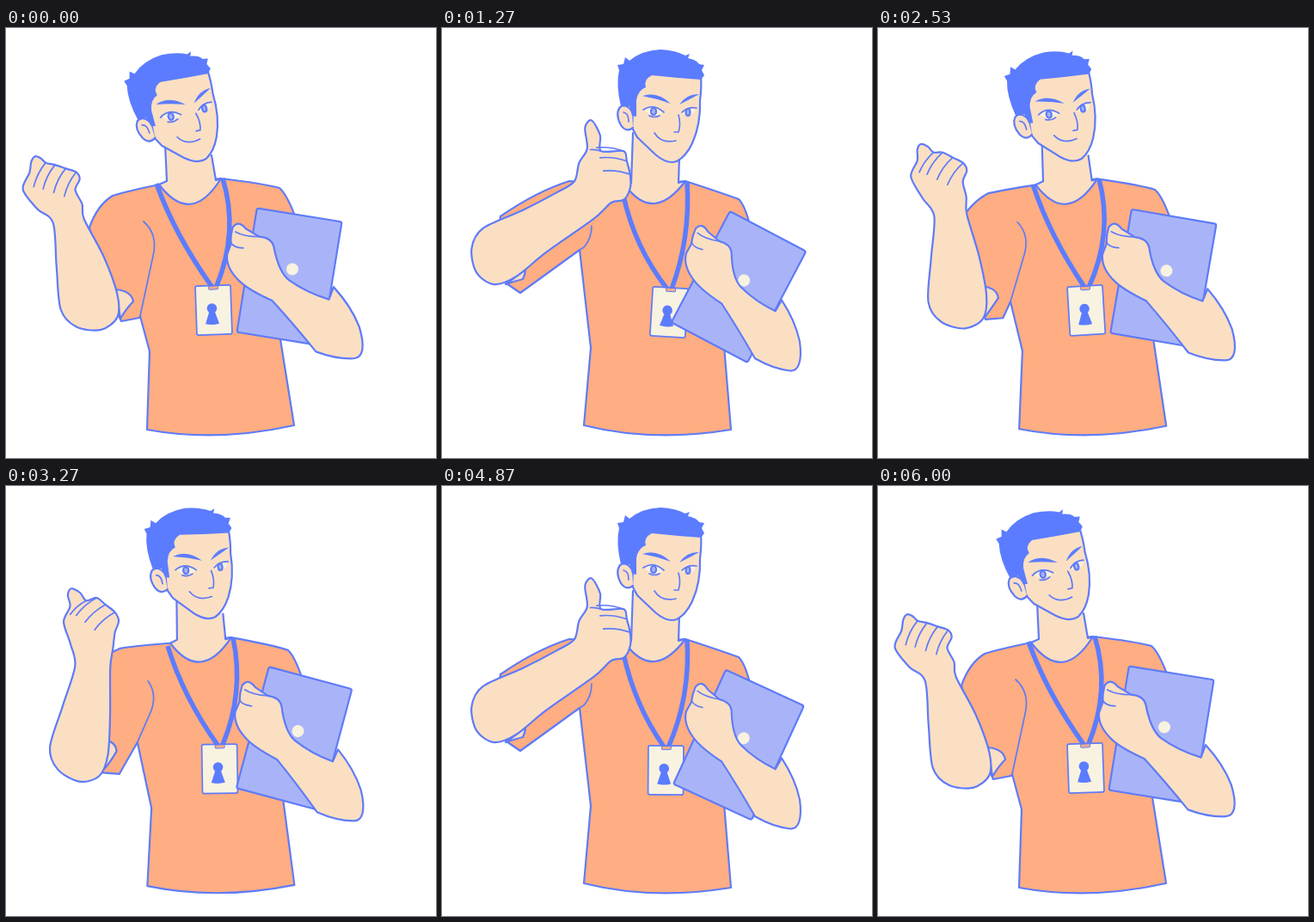
An HTML page that plays this animation: 500 by 500 pixels, repeating every 6060 ms.

```html
<!DOCTYPE html>
<html lang="en">
<head>
<meta charset="utf-8">
<title>Thumbs up</title>
<style>
  html, body { margin: 0; width: 100%; height: 100%; overflow: hidden; background: #fff; }
  svg { display: block; width: 100vw; height: 100vh; stroke-linecap: round; stroke-linejoin: round; }
  .outline { stroke: #5f7bf8; stroke-width: 2.2; }
  .skin { fill: #fbdfc3; }
  .shirt { fill: #ffad82; }
  .paper { fill: #f8f2e0; }
  .lid { fill: #a9b4f8; }
  .ink { fill: #5c7cff; stroke: none; }
  .line { fill: none; stroke-width: 1.7; }
  .strap { fill: none; stroke: #5c7cff; stroke-width: 5.5; stroke-linecap: butt; }
</style>
</head>
<body>
<svg viewBox="0 0 500 500">
  <g class="outline">
    <path id="shirt" class="shirt"/>
    <path id="armpit" class="line"/>
    <path id="neck" class="skin"/>
    <g id="head">
      <path class="skin" d="M224 62 L240 50 L301 54 Q302 70 300 84 Q301 112 291 134 Q284 149 273 155 Q262 159 248 147 L227 127 L221 116Z"/>
      <path class="skin" d="M221 97 Q214 87 207 92 Q201 100 208 113 Q214 122 222 116"/>
      <path class="line" d="M211 98 Q217 99 217 109"/>
      <path class="ink" d="M204 43 L211 42 L213 34 L218 38 Q232 26 254 25 Q272 26 283 32 L288 30 L286 35 Q296 37 299 42 L305 43 L302 49 L305 55 L301 60 Q272 58 244 55 Q234 60 237 69 Q228 72 226 84 L226 103 L221 102 L218 91 L208 91 Q202 66 206 49Z"/>
      <path class="ink" d="M233 79 Q250 73 266 88 Q250 82 233 79Z M276 89 Q285 76 299 77 Q288 83 276 89Z"/>
      <path class="paper" stroke="none" d="M236 96 Q246 88 257 99 Q246 105 236 96Z M279 100 Q287 91 295 95 Q292 104 279 100Z"/>
      <ellipse class="lid" cx="246" cy="97" rx="3" ry="4"/>
      <ellipse class="lid" cx="286" cy="98" rx="2.500" ry="4"/>
      <path class="line" d="M234 95 Q246 87 258 98 M279 98 Q286 91 296 93 M241 102 Q247 105 253 102 M275 101 Q278 112 275 121 L270 121 M247 122 Q255 135 272 131"/>
    </g>
    <path id="strapLeft" class="strap"/>
    <path id="strapRight" class="strap"/>
    <g id="badge" stroke-width="1.700">
      <rect class="paper" x="-20.500" y="-28.500" width="41" height="57" rx="2"/>
      <rect class="shirt" x="-5" y="-28" width="11" height="4" rx="1.500" stroke-width="1"/>
      <circle class="ink" cx="-2" cy="-2" r="5.800"/>
      <path class="ink" d="M-5 1 L-10 16 Q-2 18 6 16 L1 1Z"/>
    </g>
    <g id="laptop">
      <rect class="lid" x="-50" y="-73" width="100" height="146" rx="2.500"/>
      <circle class="paper" cx="2" cy="-9.500" r="7" stroke="none"/>
    </g>
    <g id="holdArm">
      <path class="skin" d="M274 231 Q281 222 289 233 L304 243 Q318 245 320 255 Q324 285 336 295 Q355 310 380 319 L386 305 Q405 328 413 352 C419 376 415 388 405 388 Q385 388 362 378 Q338 345 315 317 Q290 304 280 294 Q264 278 266 262 L271 250 Q271 240 274 231Z"/>
      <path class="line" d="M271 248 Q274 254 285 255 M277 236 Q286 242 304 243"/>
    </g>
    <path id="cuff" class="skin"/>
    <g id="arm">
      <path id="armShape" class="skin"/>
      <path id="fingers" class="line"/>
    </g>
  </g>
</svg>
<script>
const PERIOD = 3030;

// Forearm and hand with the wrist at the origin and the elbow below it
const forearm = [[-28, 55], [-35, 105], [-22, 129], [5, 139], [27, 129], [33, 103], [28, 57]];
const fist = [[16, 9], [18, -8], [14, -26], [22, -37], [20, -46], [9, -53], [-2, -60],
  [-12, -65], [-16, -71], [-22, -75], [-28, -70], [-33, -58], [-45, -41], [-34, -15], [-20, 5]];
const thumbUp = [[25, -9], [20, -37], [25, -51], [17, -65], [4, -73], [-11, -78], [-23, -81],
  [-37, -59], [-53, -68], [-73, -69], [-70, -58], [-48, -47], [-39, -30], [-24, -14], [-24, 10]];
const THUMB_BASE = 7, FIRST_FINGER = 4;

const byId = id => document.getElementById(id);
const setPath = (id, d) => byId(id).setAttribute('d', d);
const smooth = s => s * s * (3 - 2 * s);
const progress = (t, from, length) => Math.min(1, Math.max(0, (t - from) / length));
const mix = (a, b, p) => a + (b - a) * p;

function place(id, x, y, angle, extra = '') {
  byId(id).setAttribute('transform', `translate(${x} ${y}) rotate(${angle}) ${extra}`);
}

// Closed Catmull-Rom curve
function smoothPath(points) {
  const at = i => points[(i + points.length) % points.length];
  const handle = (i, side) => at(i).map((v, axis) => v + side * (at(i + 1)[axis] - at(i - 1)[axis]) / 6.5);
  return `M${at(0)}` + points.map((_, i) => `C${handle(i, 1)} ${handle(i + 1, -1)} ${at(i + 1)}`).join('') + 'Z';
}

function drawTorso(p, swing) {
  const pt = (x0, y0, x1, y1, dx = 0, dy = 0) => `${mix(x0, x1, p) + dx * swing} ${mix(y0, y1, p) + dy * swing} `;
  const collarLeft = pt(178, 182, 214, 184), collarRight = pt(250, 175, 283, 178);
  const armpit = pt(156, 335, 160, 258, -5, -10);

  setPath('shirt', `M${collarLeft}
    Q${pt(140, 190, 170, 178)}${pt(124, 195, 148, 178)}
    Q${pt(106, 206, 110, 190)}${pt(97, 232, 68, 219)}
    L${pt(110, 285, 62, 260)}${pt(134, 341, 75, 297, 0, 9)}${pt(155, 337, 91, 308, 0, 9)}
    ${armpit}${pt(167, 376, 173, 372)}${pt(164, 467, 165, 462)}
    Q245 482 ${pt(335, 462, 336, 467)}
    L${pt(319, 362, 328, 370)}${pt(335, 216, 358, 229)}
    Q${pt(326, 193, 352, 206)}${pt(318, 186, 345, 199)}
    Q${pt(300, 181, 320, 190)}${collarRight}Z`);
  setPath('armpit', `M${pt(160, 225, 174, 230)}Q${pt(177, 240, 174, 245)}${pt(171, 265, 165, 255)}L${armpit}`);
  setPath('neck', `M${pt(185, 135, 222, 122)}L${pt(187, 178, 220, 180)}${collarLeft}
    Q${pt(215, 231, 246, 227)}${collarRight}L${pt(244, 177, 275, 180)}${pt(239, 148, 276, 150)}`);
  setPath('cuff', `M${pt(128, 304, 97, 281)}Q${pt(146, 306, 97, 286)}${pt(148, 318, 94, 292)}
    Q${pt(140, 326, 86, 294, 0, 9)}${pt(133, 338, 74, 298, 0, 9)}Z`);
}

function drawArm(p, swing) {
  const stretch = 1 + 0.12 * swing;
  const hand = fist.map(([x, y], i) => [mix(x, thumbUp[i][0], p), mix(y, thumbUp[i][1], p) * stretch]);
  setPath('armShape', smoothPath([...hand, ...forearm]));

  let creases = '';
  for (let i = FIRST_FINGER; i <= THUMB_BASE; i++) {
    const length = i === THUMB_BASE ? 1 - 0.6 * p : 1;
    const [x, y] = hand[i];
    creases += `M${x} ${y}q${-13 * length} ${10 * length} ${-20 * length} ${24 * length}`;
  }
  setPath('fingers', creases);
  place('arm', mix(73, 155, p), mix(217, 206, p) - 8 * swing, mix(-13.6, 57.5, p) - 3 * swing);
}

function draw(time) {
  const t = time % PERIOD;
  const p = smooth(progress(t, 0, 800) ** 0.75) - smooth(progress(t, 2000, 850) ** 0.6);
  const swing = 4 * p * (1 - p); // peaks halfway between the two poses
  const lean = Math.sin(2 * Math.PI * progress(t, 970, 1880) ** 0.8);
  const at = (low, high) => mix(low, high, p);

  drawTorso(p, swing);
  drawArm(p, swing);
  place('head', at(212, 267) - 2 * swing, at(97.5, 97) - 2 * swing, at(-15, 0) + 2.5 * swing, 'translate(-267 -97)');
  place('laptop', at(329.5, 345), at(289.5, 301), at(9.2, 25.3) + 2.5 * lean);
  place('holdArm', 408.5, at(382, 397), at(-3, 6.3), `scale(${at(1.015, 0.97)}) translate(-409 -386)`);

  const badgeX = at(241.5, 261) + 3 * lean, badgeY = at(328, 330.5);
  place('badge', badgeX, badgeY, at(-2, 1) + 2.5 * lean);
  setPath('strapLeft', `M${at(175, 211)} ${at(181, 195)}Q${at(196, 224)} ${at(240, 255)} ${badgeX - 2} ${badgeY - 27}`);
  setPath('strapRight', `M${at(252, 285)} ${at(175, 179)}Q${at(271, 289)} ${at(237, 245)} ${badgeX + 3} ${badgeY - 27}`);
}

const start = performance.now();
function tick() {
  draw(performance.now() - start);
  requestAnimationFrame(tick);
}
tick();
</script>
</body>
</html>
```
